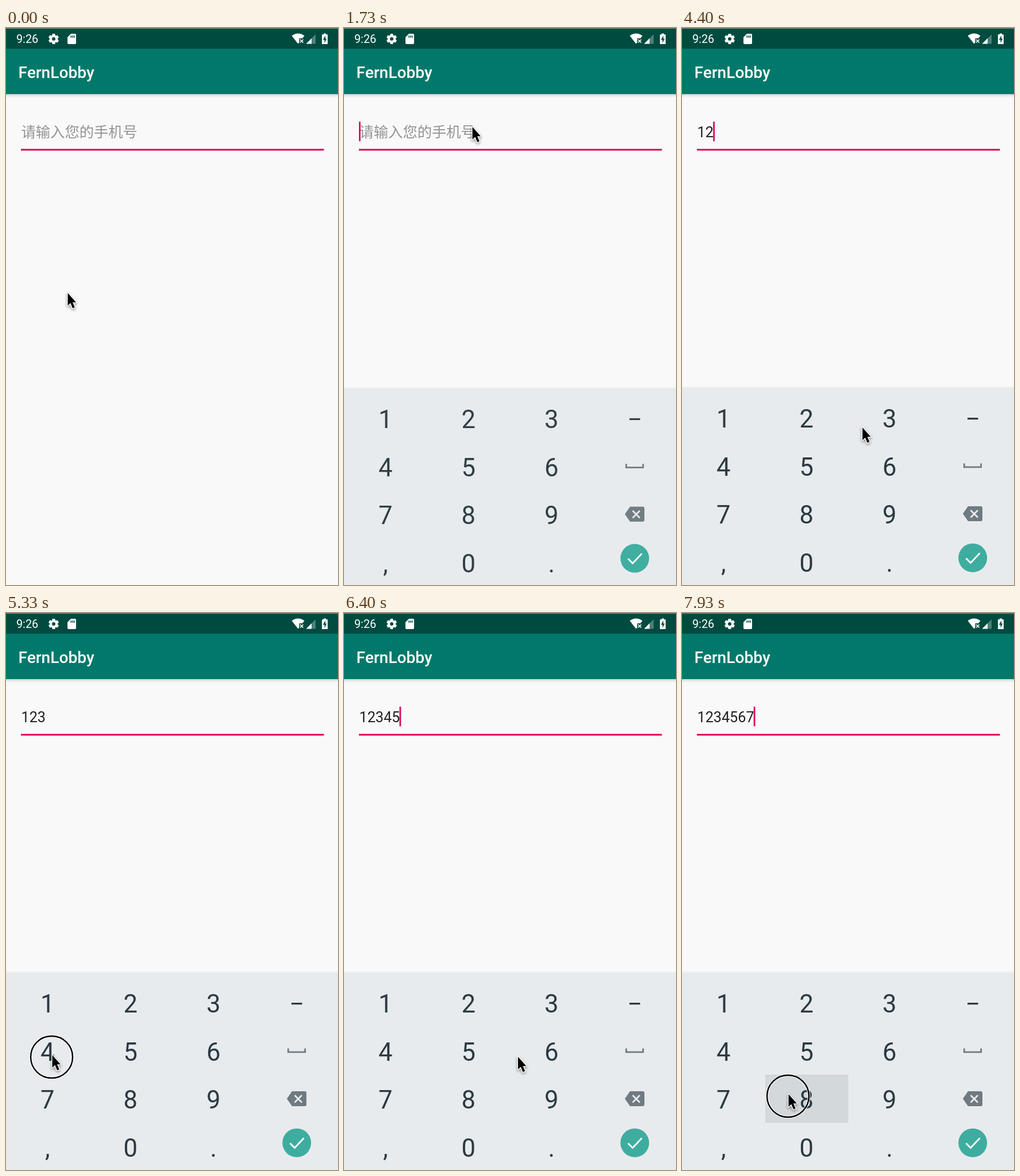
Recreate the animation shown at these times as an HTML page with a canvas. Size 578 by 969 pixels, loop 8000 ms.

```html
<!DOCTYPE html>
<html lang="zh">
<head>
<meta charset="utf-8">
<style>
  html, body { margin: 0; width: 100%; height: 100%; overflow: hidden; background: #f9f9f9; }
  canvas { display: block; }
</style>
</head>
<body>
<canvas id="stage" width="578" height="969"></canvas>
<script>
const ctx = document.getElementById('stage').getContext('2d');
const LOOP = 8000, ACCENT = '#db0a5b', INK = '#2b3a42', GREY = '#6f7a81';
const COL = 144.5, ROW = 83.5, KEYS_TOP = 636;
const ROBOTO = 'Roboto, sans-serif';

// Pointer moves: start, end, x, y
const moves = [
  [0, 0, 107, 461], [30, 900, 223, 172], [1760, 2560, 73, 666],
  [3100, 3800, 215, 690], [4070, 4578, 352, 697], [4700, 5270, 80, 769],
  [5470, 5960, 222, 772], [6150, 6578, 350, 772], [6780, 7360, 72, 845],
  [7500, 7770, 185, 837]
];

// Presses: down, up, column and row of the lit key
const presses = [
  [940, 1110], [2920, 3040], [3860, 3990, 1, 0], [4590, 4670, 2, 0],
  [5300, 5400, 0, 1], [6000, 6100, 1, 1], [6620, 6730, 2, 1],
  [7380, 7470, 0, 2], [7830, 8100, 1, 2]
];
const typed = presses.slice(1).map(p => p[1]);

function pointerAt(t) {
  let x = 0, y = 0;
  for (const [start, end, nx, ny] of moves) {
    if (t < start) break;
    const p = end > start ? Math.min(1, (t - start) / (end - start)) : 1;
    const e = p * p * (3 - 2 * p);
    x += (nx - x) * e;
    y += (ny - y) * e;
  }
  return [x, y];
}

function rect(x, y, w, h, color) {
  ctx.fillStyle = color;
  ctx.fillRect(x, y, w, h);
}

function text(str, x, y, font, color, align = 'left') {
  ctx.font = font;
  ctx.fillStyle = color;
  ctx.textAlign = align;
  ctx.fillText(str, x, y);
}

function shape(d, color) {
  ctx.fillStyle = color;
  ctx.fill(new Path2D(d), 'evenodd');
}

function line(d, color, width) {
  ctx.strokeStyle = color;
  ctx.lineWidth = width;
  ctx.stroke(new Path2D(d));
}

function circle(x, y, r, color) {
  ctx.beginPath();
  ctx.arc(x, y, r, 0, 7);
  ctx.fillStyle = color;
  ctx.fill();
}

function shade(y, h, from, to) {
  const g = ctx.createLinearGradient(0, y, 0, y + h);
  g.addColorStop(0, from);
  g.addColorStop(1, to);
  rect(0, y, 578, h, g);
}

function gear(x, y) {
  ctx.save();
  ctx.translate(x, y);
  for (let i = 0; i < 6; i++) {
    ctx.rotate(Math.PI / 3);
    shape('M-3.2 -5L-2.2 -9H2.2L3.2 -5Z', '#fff');
  }
  ctx.restore();
  circle(x, y, 6.8, '#fff');
  circle(x, y, 3, '#004b40');
}

function drawHeader() {
  rect(0, 0, 578, 36, '#004b40');
  rect(0, 0, 578, 1.3, '#71807d');
  rect(0, 36, 578, 79, '#00796b');
  shade(115, 6, 'rgba(0,0,0,.15)', 'rgba(0,0,0,0)');
  text('9:26', 18, 26.3, '400 19.8px ' + ROBOTO, '#fff');
  gear(83, 19);
  shape('M113 10H120Q122 10 122 12V26Q122 28 120 28H109Q107 28 107 26V16Z'
    + 'M112.5 13V17H114V13ZM115.3 13V17H116.8V13ZM118 13V17H119.5V13Z', '#fff');
  shape('M497.5 13.5Q508.5 5.5 519.5 13.5L516 18H510.5V25L508.5 27.5Z', '#fff');
  line('M512 20L517.5 25.5M517.5 20L512 25.5', '#fff', 1.7);
  shape('M522.5 27.5L539 11V27.5Z', 'rgba(255,255,255,.3)');
  shape('M522.5 27.5L532 18V27.5Z', '#fff');
  shape('M553 9.5H557V11.3H560V28H550V11.3H553ZM556 13L551.8 20.5H554.5V26L558.4 18.5H556Z', '#fff');
  text('FernLobby', 21.5, 86.5, '500 28.1px ' + ROBOTO, '#fff');
}

function drawField(t) {
  const done = typed.filter(d => d <= t);
  const value = '1234567'.slice(0, done.length);
  if (value) text(value, 26.5, 190, '400 25.2px ' + ROBOTO, '#222');
  else text('请输入您的手机号', 26.5, 190,
    '400 25.3px "Noto Sans CJK SC", "Noto Sans CJK", sans-serif', '#949494');
  rect(26, 210.3, 527.5, 3, ACCENT);
  // The caret blinks every half second and restarts with each digit.
  const since = t - (done.length ? done[done.length - 1] : -730);
  if (since % 1000 < 500) rect(26 + value.length * 14.1, 163, 2.8, 34, ACCENT);
}

function drawKeys(t) {
  if (t < 1580) return;
  const left = (1 - Math.min(1, (t - 1580) / 290)) ** 5;
  ctx.save();
  ctx.globalAlpha = 1 - left;
  ctx.translate(0, 34 * left);
  shade(623, 3, 'rgba(0,0,0,0)', 'rgba(0,0,0,.05)');
  rect(0, 626, 578, 343, '#e8ebed');
  for (const [down, up, col, row] of presses) {
    if (col !== undefined && t >= down + 45 && t < up + 60)
      rect(col * COL + .5, KEYS_TOP + row * ROW, COL, ROW + .5, '#d3d8db');
  }
  [...'123456789,0.'].forEach((key, i) => text(key, (i % 3 + .5) * COL,
    695.3 + Math.floor(i / 3) * ROW, '400 43.5px ' + ROBOTO, INK, 'center'));
  rect(497, 678, 18.5, 3.2, INK);
  line('M491.3 757.5V763.8H520.7V757.5', GREY, 2.8);
  shape('M498 832H520Q523 832 523 835V855Q523 858 520 858H498L489 845Z', GREY);
  line('M502.5 839L515 851.5M515 839L502.5 851.5', '#e8ebed', 2.8);
  circle(506.2, 921.7, 25, '#3eada0');
  line('M494.5 922.5L502.5 930.5L518.5 913.5', '#fff', 2.8);
  ctx.restore();
}

function drawPointer(t) {
  const [x, y] = pointerAt(t);
  if (presses.some(([down, up]) => t >= down && t < up)) {
    ctx.beginPath();
    ctx.arc(x - .5, y + 3.5, 36.5, 0, 7);
    for (const [color, width] of [['rgba(255,255,255,.75)', 5], ['#000', 2.4]]) {
      ctx.strokeStyle = color;
      ctx.lineWidth = width;
      ctx.stroke();
    }
  }
  const arrow = 'M.5 0V22L5.3 17.6L9 26.5L12.8 25L9 16.2H15Z';
  ctx.save();
  ctx.translate(x, y);
  ctx.lineJoin = 'round';
  ctx.shadowColor = 'rgba(0,0,0,.45)';
  ctx.shadowBlur = 4;
  ctx.shadowOffsetY = 2;
  line(arrow, '#fff', 2.8);
  ctx.shadowColor = 'transparent';
  shape(arrow, '#000');
  ctx.restore();
}

function frame(now) {
  const t = now % LOOP;
  rect(0, 0, 578, 969, '#f9f9f9');
  drawHeader();
  drawField(t);
  drawKeys(t);
  drawPointer(t);
  requestAnimationFrame(frame);
}
frame(0);
</script>
</body>
</html>
```
